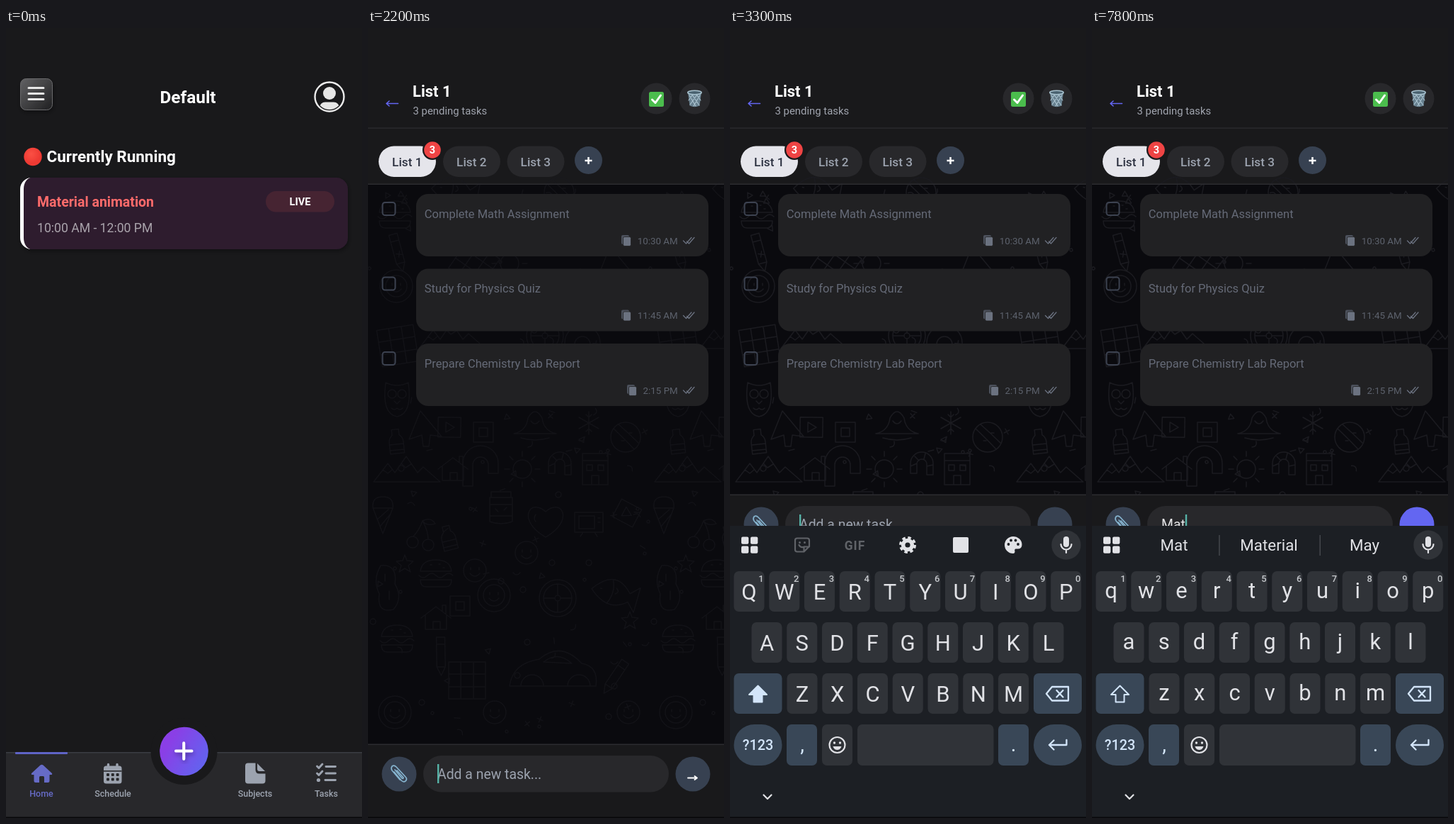
Recreate the animation shown at these times as an HTML page. Size 503 px wide and 1114 px high, loop 8 s.

```html
<!DOCTYPE html>
<html lang="en">
<head>
<meta charset="utf-8">
<title>Task list</title>
<style>
  html, body { margin: 0; width: 100%; height: 100%; overflow: hidden; background: #19191b; }
  svg { display: block; width: 100vw; height: 100vh; font-family: Roboto, sans-serif; }
</style>
</head>
<body>
<svg id="stage" viewBox="0 0 503 1114" preserveAspectRatio="none"></svg>
<script>
const LOOP = 8000, STEP = 100, WIDTH = 503;
const BG = '#19191b', PANEL = '#28282b', SLATE = '#374151', GREY = '#9ca3af', INDIGO = '#6366f1';
const KEY = '#303338', KEY_ALT = '#394757', KB = '#1c1f24', INK = '#e1e2e6', SKY = '#d3e5fa', DIM = '#606368';

// Drawing helpers that return SVG markup
const rect = (x, y, w, h, r, fill, more = '') =>
  `<rect x="${x}" y="${y}" width="${w}" height="${h}" rx="${r}" fill="${fill}" ${more}/>`;
const disc = (x, y, r, fill, more = '') => `<circle cx="${x}" cy="${y}" r="${r}" fill="${fill}" ${more}/>`;
const fill = (d, color, more = '') => `<path d="${d}" fill="${color}" ${more}/>`;
const line = (d, color, w, more = '') =>
  `<path d="${d}" fill="none" stroke="${color}" stroke-width="${w}" stroke-linecap="round" stroke-linejoin="round" ${more}/>`;
const text = (x, y, size, str, color, more = '') =>
  `<text x="${x}" y="${y}" font-size="${size}" fill="${color}" ${more}>${str}</text>`;
const group = (body, more = '') => `<g ${more}>${body}</g>`;
const MID = 'text-anchor="middle" ', BOLD = 'font-weight="700" ', MEDIUM = 'font-weight="500" ';

function seeded(seed) {
  return () => {
    seed = (seed * 16807) % 2147483647;
    return seed / 2147483647;
  };
}

const defs = `<defs>
  <linearGradient id="fab" x1="0" y1="0.2" x2="1" y2="0.8"><stop offset="0.2" stop-color="#8a3fe6"/><stop offset="1" stop-color="#5f66f0"/></linearGradient>
  <linearGradient id="menu" x1="0" y1="0" x2="1" y2="1"><stop offset="0" stop-color="#626264"/><stop offset="1" stop-color="#1f1f21"/></linearGradient>
  <radialGradient id="red" cx="0.4" cy="0.35"><stop offset="0" stop-color="#fa5044"/><stop offset="1" stop-color="#ee3a33"/></radialGradient>
  <filter id="shade" x="-30%" y="-30%" width="160%" height="160%"><feDropShadow dx="1" dy="3" stdDeviation="3" flood-opacity="0.35"/></filter>
  <clipPath id="face"><circle cx="457" cy="97" r="18"/></clipPath>
</defs>`;

function homeScreen() {
  const tab = (x, label, color) => text(x, 1084, 12.5, label, color, MID + MEDIUM);
  let dots = '';
  for (let i = 0; i < 6; i++) dots += rect(142 + (i % 3) * 6.8, 1051 + (i > 2 ? 6.6 : 0), 4, 4, 1, PANEL);
  return rect(0, 0, WIDTH, 1114, 0, BG) +
    rect(20.5, 71.5, 45, 44, 8, 'url(#menu)', 'stroke="#6a6a6c" filter="url(#shade)"') +
    line('M32 84.5H53M32 92.5H53M32 100.5H53', '#e6e6e6', 3) +
    text(257, 106, 24.4, 'Default', '#fff', MID + BOLD) +
    disc(457, 97, 20.5, 'none', 'stroke="#ececec" stroke-width="2.4"') +
    disc(457, 92, 9, '#e6e6e6') +
    rect(443, 104.5, 28, 20, 8, '#e6e6e6', 'clip-path="url(#face)"') +
    disc(38, 181.5, 12.7, 'url(#red)') +
    text(57.5, 189, 22.5, 'Currently Running', '#fff', BOLD) +
    rect(20, 211, 463, 101, 16, '#2d1b2e', 'filter="url(#shade)"') +
    fill('M36 211a16 16 0 0 0-16 16V296a16 16 0 0 0 16 16a11 16 0 0 1-11-16V227a11 16 0 0 1 11-16Z', '#fff') +
    text(44, 252, 19.5, 'Material animation', '#ff6b6b', 'font-weight="600"') +
    text(44, 288, 17.6, '10:00 AM - 12:00 PM', '#aaa4ac') +
    rect(367, 230, 97, 29.5, 14.7, '#462432') +
    text(415.5, 250, 14.7, 'LIVE', '#fff', MID + BOLD) +
    rect(0, 1021, WIDTH, 93, 0, PANEL) + rect(0, 1021, WIDTH, 1.5, 0, '#3b3d44') +
    rect(13, 1021, 74, 3, 1, '#5f64c6') +
    disc(251.5, 1020, 47, BG) + disc(251.5, 1020, 34.3, 'url(#fab)') +
    line('M240 1019.5H262.5M251.2 1008.3V1030.8', '#fff', 4, 'filter="url(#shade)"') +
    fill('M48.5 1039.5q2-1.6 4 0L65 1051q.8 2-1.5 2H61.500V1061.500q0 2.500-2.500 2.500H54v-7.500q0-1.500-1.500-1.500h-4q-1.500 0-1.500 1.500V1064H42q-2.500 0-2.500-2.500V1053H37.500q-2.300 0-1.500-2Z', '#666bc6') +
    rect(138, 1040.5, 25.5, 25, 3.5, GREY) + rect(138, 1047, 25.5, 1.6, 0, PANEL) +
    line('M144.500 1038.500V1042M157 1038.500V1042', GREY, 3.4) + dots +
    fill('M342 1036.500H352.500V1046q0 5.500 5.500 5.500H366.500V1061.500q0 4-4 4H342q-4 0-4-4V1040.500q0-4 4-4ZM355 1037L366 1048H358q-3 0-3-3Z', GREY) +
    line('M439.500 1041l2.500 2.500l5-5.500M439.500 1051l2.500 2.500l5-5.500M452 1041.500H465.500M452 1051H465.500M451 1060.500H465.500', GREY, 2.9) +
    disc(441.5, 1060.5, 2.6, GREY) +
    tab(50, 'Home', '#666bc6') + tab(151, 'Schedule', GREY) + tab(352, 'Subjects', GREY) + tab(452.5, 'Tasks', GREY);
}

const ring = r => `M${-r} 0a${r} ${r} 0 1 0 ${2 * r} 0a${r} ${r} 0 1 0 ${-2 * r} 0`;
const doodles = {
  sun: ring(13) + 'M0-18v-7M0 18v7M-18 0h-7M18 0h7M13-13l5-5M-13-13l-5-5M13 13l5 5M-13 13l-5 5',
  hill: 'M-48 18L-28-8L-18 5L-2-18L14 5L22-3L46 18ZM-35 1l7 5l6-5M-9-8l6 6l8-5',
  house: 'M-21 0L0-16L21 0M-15-4V16H15V-4M-4 16V5H6V16M9-10v-8h5v12',
  tower: 'M-18-22H18V22H-18ZM-18-12H18M-12-6h8v8h-8ZM4-6h8v8h-8ZM-5 22V9H5V22',
  burger: 'M-22-4Q-20-20 0-20T22-4ZM-24 2q6 6 12 0t12 0t12 0t12 0M-22 8H22Q22 18 14 18H-14Q-22 18-22 8M-8-13h2M4-14h2M10-9h2',
  face: ring(23) + ring(15) + 'M-6-4v3M6-4v3M-7 4Q0 12 7 4',
  smile: ring(16) + 'M-6-4v3M6-4v3M-7 4Q0 12 7 4',
  owl: 'M-16-22Q0-14 16-22Q22 22 0 26Q-22 22-16-22M-13-6a6 6 0 1 0 12 0a6 6 0 1 0-12 0M1-6a6 6 0 1 0 12 0a6 6 0 1 0-12 0M-4 4l4 4l4-4M-8 14q4 4 8 0q4 4 8 0',
  dart: 'M-8-22L22 14L6 12L4 28L-4 28L-6 12L-24 18Z',
  bottle: 'M-5-18H5V-10Q10-6 10 0V16H-10V0Q-10-6-5-10ZM-10 3H10M-10 11H10',
  play: 'M-16-14H16V14H-16ZM-5-7L7 0L-5 7Z',
  chip: 'M-14-14H14V14H-14ZM-6-6H6V6H-6Z',
  ball: ring(21) + 'M-17-12Q0 4 12 17M-10-18Q4-6 18 8M-6 5h4M5-6h4',
  flake: 'M0-16V16M-14-8L14 8M-14 8L14-8M-4-12l4 4l4-4M-4 12l4-4l4 4',
  pot: 'M-30 14Q-12 10-10-8Q0-26 10-8Q12 10 30 14ZM-20 20Q0 26 20 20M-6-4Q0 4 6-4',
  arch: 'M-22 36V4A25 25 0 0 1 28 4V18H14V6A11 11 0 0 0-8 6V36Z',
  cane: 'M-16 10V-4A15 15 0 0 1 16-4V12H7V-3A7 7 0 0 0-7-3V10ZM-16 0l9-4M-10-14l6 6M5-18l-2 8M16-2l-9 2',
  cone: 'M-14-8L0 28L14-8ZM-14-8Q-16-24 0-24T14-8M-8 8L8-6M-4 18L11 0',
  cherry: 'M-18 10a8 8 0 1 0 16 0a8 8 0 1 0-16 0M4 14a8 8 0 1 0 16 0a8 8 0 1 0-16 0M-9 2Q0-8 4-20Q12-6 12 6M4-20q12-6 18 4q-12 4-18-4',
  jar: 'M-14-20H14V-12H-14ZM-16-12H16V22Q0 28-16 22ZM-16-2H16M-16 14H16M-8 4l4 4M4 6l4-4',
  heart: 'M0 24C-42 0-22-32 0-12C22-32 42 0 0 24M-14-8q-4 6 0 10',
  tv: 'M-20-14H20V14H-20ZM-14-9H8V9H-14ZM-8 14l-4 6M8 14l4 6M13-6h3M13 0h3',
  bean: 'M-10-32Q14-34 10-6Q22 14 8 30Q-16 36-12 8Q-22-12-10-32M-4-20v10M2 4v12',
  fish: 'M-30 4Q-4-34 24-4L36-16V20L24 8Q0 30-30 4M-18 0h2M-4-16Q4 0-4 18M4-6q6 4 0 8',
  wheel: ring(26) + ring(20) + ring(4) + 'M0-20V-4M0 4V20M-20 0H-4M4 0H20',
  cards: 'M-26-26H26V26H-26ZM-9-26V26M9-26V26M-26-9H26M-26 9H26',
  pen: 'M-6-26H6V16L0 28L-6 16ZM-6-16H6M-6 16H6',
  car: 'M-62 20Q-58-12-20-18Q10-44 40-12Q64-8 60 20ZM-14-14Q6-30 26-12ZM-46 20a16 16 0 1 1 32 0M20 20a16 16 0 1 1 32 0',
  star: 'M0-12L3-4L12-3L5 3L8 12L0 7L-8 12L-5 3L-12-3L-3-4Z'
};

const places = `burger 38 264, pen 42 316, face 40 364, cards 42 448, owl 41 522, dart 82 562, bottle 40 584,
  play 115 563, chip 163 570, ball 364 577, flake 312 557, arch 156 610, hill 56 622, house 120 622, sun 218 622, cane 271 618,
  tower 321 622, pot 236 558, cone 21 685, cherry 73 715, bottle 114 720, jar 188 674, heart 251 694, tv 312 697,
  play 366 684, smile 224 740, smile 151 765, bean 28 790, burger 96 770, chip 130 815, face 178 800, wheel 268 804, fish 346 795,
  burger 41 862, pen 103 885, cards 140 920, car 262 908, pen 349 915, face 38 965, smile 179 965, smile 368 965, star 52 755,
  star 370 835, house 96 832, fish 120 228, ball 270 232, dart 350 330, cards 150 332, wheel 250 434, sun 200 332, arch 300 440, hill 120 434`;

function wallpaper() {
  const rnd = seeded(77);
  let art = '';
  for (const item of places.split(',')) {
    const [name, x, y] = item.trim().split(' ');
    const tilt = /pen|cards|play|bottle|fish/.test(name) ? (rnd() * 50 - 15).toFixed(0) : 0;
    art += `<path d="${doodles[name]}" transform="translate(${x} ${y}) rotate(${tilt})"/>`;
  }
  const bits = [ring(2), ring(4), 'M-4 0H4', 'M-4 3L0-4L4 3Z', 'M-5 0Q0-6 5 0', 'M-3-3L3 3M-3 3L3-3'];
  for (let i = 0; i < 120; i++) {
    const x = (rnd() * 397).toFixed(0), y = (228 + rnd() * 775).toFixed(0), a = (rnd() * 180).toFixed(0);
    art += `<path d="${bits[i % bits.length]}" transform="translate(${x} ${y}) rotate(${a})"/>`;
  }
  return group(`<g id="tile">${art}</g><use href="#tile" x="397"/>`,
    'id="paper" fill="none" stroke="#1b1b20" stroke-width="1.5" stroke-linejoin="round" stroke-linecap="round"');
}

function taskRow(i, title, time) {
  const y = 234 + i * 105.5, iconX = time.length > 7 ? 358 : 366;
  return rect(20.5, y + 12, 18, 18, 3.5, 'none', 'stroke="#3c4250" stroke-width="2"') +
    rect(68, y, 413, 88, 17, '#212123') +
    text(79.8, y + 33.5, 16.5, title, '#656a77') +
    rect(iconX, y + 58, 11, 13, 2, '#4c515c') +
    rect(iconX + 2.5, y + 60.5, 11, 13, 2, '#6b7280', 'stroke="#212123" stroke-width="0.8"') +
    text(437.8, y + 70.5, 13.4, time, '#5d626d', 'text-anchor="end"') +
    line(`M445.5 ${y + 66}l4 4l7.500-8.500M450.500 ${y + 67}l3 3l7.500-8.500`, '#6b7280', 1.3);
}

function footer() {
  return rect(0, 1010, WIDTH, 104, 0, BG) + rect(0, 1009.5, WIDTH, 1.5, 0, '#2c2c30') +
    rect(0, 1113.3, WIDTH, 400, 0, '#f2f2f2') +
    disc(44, 1052, 24.5, SLATE) +
    line('M37 1049l10 12q3 3 6 1q3-3 0-6L40 1042q-3-3-6-1q-2 3 0 6l11 13M38 1046l10 12q2 1 2-1L41 1047', '#86b4cf', 1.7) +
    rect(78, 1026, 347, 51.5, 25.7, PANEL) +
    disc(459, 1052, 24.5, SLATE, 'id="send"') +
    line('M452 1057.500H464M461.500 1055l3.500 2.500l-3.500 2.500', '#fff', 1.8) +
    text(98, 1059, 19.4, 'Add a new task...', GREY, 'id="entry"') +
    rect(98, 1038, 2.4, 27, 0, '#56b3a8', 'id="caret"');
}

function listScreen() {
  const pill = (x, label, back, color) =>
    rect(x, 166.5, 81, 43.5, 21.7, back) + text(x + 40.3, 195, 17.2, label, color, MID + MEDIUM);
  return rect(0, 0, WIDTH, 1114, 0, BG) +
    line('M26 106.500H42.500M30 103L26 106.500L30 110', INDIGO, 1.6) +
    text(63, 97, 22, 'List 1', '#fff', BOLD) +
    text(63.5, 122, 14.9, '3 pending tasks', '#a0a4ae') +
    disc(407.5, 99.5, 22, PANEL) + disc(461.5, 99.5, 22, PANEL) +
    rect(397, 90, 21, 21, 2.5, '#4bbd4d') + line('M401.500 101l4.500 4.500L413.500 95', '#fff', 3) +
    fill('M452 91L454.500 109.500Q461.500 113 468.500 109.500L471 91Z', '#67808f') +
    line('M454 95L463 110M458 94L468 109M465 95L470 102M469 95L460 110M465 94L455 108M458 95L453 102', '#adc5d2', 1.1) +
    `<ellipse cx="461.500" cy="91" rx="9.800" ry="2.800" fill="#4a6270" stroke="#a9c3d0" stroke-width="1.500"/>` +
    rect(0, 140.5, WIDTH, 1.3, 0, '#2c2c30') +
    pill(15, 'List 1', '#e5e5eb', '#2c3140') + pill(106, 'List 2', PANEL, GREY) + pill(196.5, 'List 3', PANEL, GREY) +
    disc(91, 172, 14, BG) + disc(91, 172, 11.8, '#ef4444') + text(91, 177, 14.5, '3', '#fff', MID + BOLD) +
    disc(311.5, 186.5, 19.5, SLATE) + line('M306.500 187H316.500M311.500 182V192', '#fff', 2.5, 'style="stroke-linecap:butt"') +
    rect(0, 220, WIDTH, 894, 0, '#0a0a0e') + wallpaper() + rect(0, 219.5, WIDTH, 1.5, 0, '#2c2c30') +
    taskRow(0, 'Complete Math Assignment', '10:30 AM') +
    taskRow(1, 'Study for Physics Quiz', '11:45 AM') +
    taskRow(2, 'Prepare Chemistry Lab Report', '2:15 PM') +
    group(footer(), 'id="foot"');
}

const PITCH = 49.75;
const rows = [['QWERTYUIOP', 27, 766], ['ASDFGHJKL', 52, 838], ['ZXCVBNM', 102, 910]];

function toolIcons() {
  let holes = '';
  for (const [x, y] of [[393.5, 728], [397, 722.5], [403.5, 722.5], [407, 728]]) holes += disc(x, y, 1.9, KB);
  return line('M95 719.500H109q3 0 3 3V731l-7.500 7.500H95q-3 0-3-3V722.500q0-3 3-3ZM104.500 738V731.500H112M97.500 729q2 4 6 3', DIM, 2.2) +
    disc(98.5, 725.5, 1.5, DIM) + disc(105.5, 725.5, 1.5, DIM) +
    text(176.5, 735.5, 17.5, 'GIF', DIM, MID + BOLD + 'letter-spacing="1"') +
    disc(251, 729, 6.4, 'none', `stroke="${INK}" stroke-width="5.600"`) +
    disc(251, 729, 10, 'none', `stroke="${INK}" stroke-width="4" stroke-dasharray="4.400 3.454"`) +
    rect(315, 718, 22, 22, 2, INK) +
    fill('M400 717a12.500 11.500 0 0 1 12.500 11.500q0 6-6 6h-3q-2 1-1 3.500q0 3-2.500 3a12 12 0 0 1 0-24Z', INK) + holes;
}

function suggestions() {
  return [116, 250, 385].map(x => text(x, 737, 22.4, '', INK, MID + 'class="word"')).join('') +
    rect(179.2, 715, 1.5, 29, 0, '#44474c') + rect(321.5, 715, 1.5, 29, 0, '#44474c');
}

function keyboard() {
  let out = rect(0, 702, WIDTH, 412, 0, KB);
  for (const x of [16, 29]) for (const y of [717.5, 730.5]) out += rect(x, y, 10.3, 10.3, 2, INK);
  out += group(toolIcons(), 'id="tools"') + group(suggestions(), 'id="words"') +
    disc(475, 729, 20.7, KEY) + rect(471, 717, 8, 15, 4, INK) + line('M467.500 728a7.500 7.500 0 0 0 15 0M475 736V740', INK, 2.2);
  rows.forEach(([letters, x0, y], row) => [...letters].forEach((ch, i) => {
    const x = x0 + i * PITCH;
    out += rect(x - 21.5, y, 43, 57, 7, KEY, `id="cap${ch}"`) +
      text(x, y + 39.5, 31, ch, INK, `${MID}class="key" id="key${ch}"`);
    if (row === 0) out += text(x + 17, y + 15, 13, (i + 1) % 10, '#c6c9cd', MID + MEDIUM);
  }));
  return out + rect(5.5, 910, 68, 57, 7, KEY_ALT) + rect(429, 910, 68, 57, 7, KEY_ALT) +
    line('M39.500 927.500L52 940H45.500V950.500H33.500V940H27Z', SKY, 2, 'id="shift"') +
    line('M455 929H478V948.500H455L447 938.700ZM461.500 934l9 9.500M470.500 934l-9 9.500', SKY, 2.3) +
    rect(5.5, 982, 68, 58, 29, KEY_ALT) + text(39.5, 1018, 19.8, '?123', SKY, MID + MEDIUM) +
    rect(80, 982, 43, 58, 7, KEY_ALT) + text(102, 1020, 29, ',', SKY, MID) +
    rect(130, 982, 43, 58, 7, KEY) + disc(151.5, 1011, 11, 'none', `stroke="${INK}" stroke-width="2.200"`) +
    disc(147.5, 1008, 1.7, INK) + disc(155.5, 1008, 1.7, INK) + fill('M145.500 1013H157.500Q156 1018 151.500 1018T145.500 1013Z', INK) +
    rect(180, 982, 192.5, 58, 7, KEY) +
    rect(379, 982, 43, 58, 7, KEY_ALT) + text(400.5, 1020, 29, '.', SKY, MID) +
    rect(429, 982, 68, 58, 29, KEY_ALT) + line('M475.500 1004V1011H451M457.500 1004.500L451 1011L457.500 1017.500', SKY, 2.3) +
    line('M47.500 1081.500l5.500 5.500l5.500-5.500', INK, 2.2) +
    group(disc(400.5, 867, 34.5, '#303337', 'filter="url(#shade)"') + text(400.5, 878.5, 33, 'M', INK, MID), 'id="popup"');
}

const stage = document.getElementById('stage');
stage.innerHTML = defs + group(homeScreen(), 'id="home"') + group(listScreen(), 'id="page"') +
  group(keyboard(), 'id="board"') + rect(0, 1112.5, WIDTH, 2, 0, '#08080a');

const $ = id => document.getElementById(id);
const set = (id, name, value) => $(id).setAttribute(name, value);
const show = (id, on) => set(id, 'visibility', on ? 'visible' : 'hidden');
const move = (id, x, y) => set(id, 'transform', `translate(${x} ${y})`);
const unit = v => Math.min(1, Math.max(0, v));

// Typing steps: start time, text, suggested words
const typing = [
  [0, '', []], [7400, 'M', []], [7500, 'M', ['M', 'My', 'Me']],
  [7700, 'Ma', ['Ma', 'May', 'Make']], [7800, 'Mat', ['Mat', 'Material', 'May']]
];

function caretOn(t) {
  if (t < 3300) return t >= 2200 && t < 2700;
  return t >= 7300 || Math.floor((t - 3300) / 500) % 2 === 0;
}

function draw(t) {
  const x = t < 1200 ? WIDTH : WIDTH * Math.pow(1 - unit((t - 1100) / 500), 2.94);
  move('page', x, 0);
  move('home', x - WIDTH, 0);

  const open = t >= 2400;
  const drop = 240 * Math.pow(1 - unit((t - 2300) / 400), 3.57);
  show('board', open);
  move('board', 0, drop);
  set('board', 'opacity', 1 - 0.11 * unit(drop / 86));
  move('foot', 0, open ? -352 : 0);
  set('paper', 'opacity', open ? unit((t - 2400) / 300) : 0.5);

  const [, typed, words] = typing.filter(s => t >= s[0]).pop();
  const entry = $('entry');
  entry.textContent = typed || 'Add a new task...';
  entry.setAttribute('fill', typed ? '#e6e6e8' : GREY);
  set('caret', 'x', 98 + (typed ? entry.getComputedTextLength() : 0));
  show('caret', caretOn(t));
  set('send', 'fill', typed ? INDIGO : SLATE);

  set('tools', 'display', words.length ? 'none' : 'inline');
  set('words', 'display', words.length ? 'inline' : 'none');
  document.querySelectorAll('.word').forEach((el, i) => { el.textContent = words[i] || ''; });

  const pressed = t === 7300 ? 'M' : t === 7700 ? 'A' : '';
  document.querySelectorAll('.key').forEach(el => {
    const ch = el.id.slice(3), down = ch === pressed;
    el.textContent = typed ? ch.toLowerCase() : ch;
    el.setAttribute('dy', typed ? -2 : 0);
    el.setAttribute('fill', down ? '#56595d' : INK);
    set('cap' + ch, 'fill', down ? KB : KEY);
  });
  set('shift', 'fill', typed ? 'none' : SKY);
  set('popup', 'display', pressed === 'M' ? 'inline' : 'none');
}

let last = -1;
function tick() {
  const t = Math.floor((performance.now() % LOOP) / STEP) * STEP;
  if (t !== last) draw(last = t);
  requestAnimationFrame(tick);
}
tick();
</script>
</body>
</html>
```
